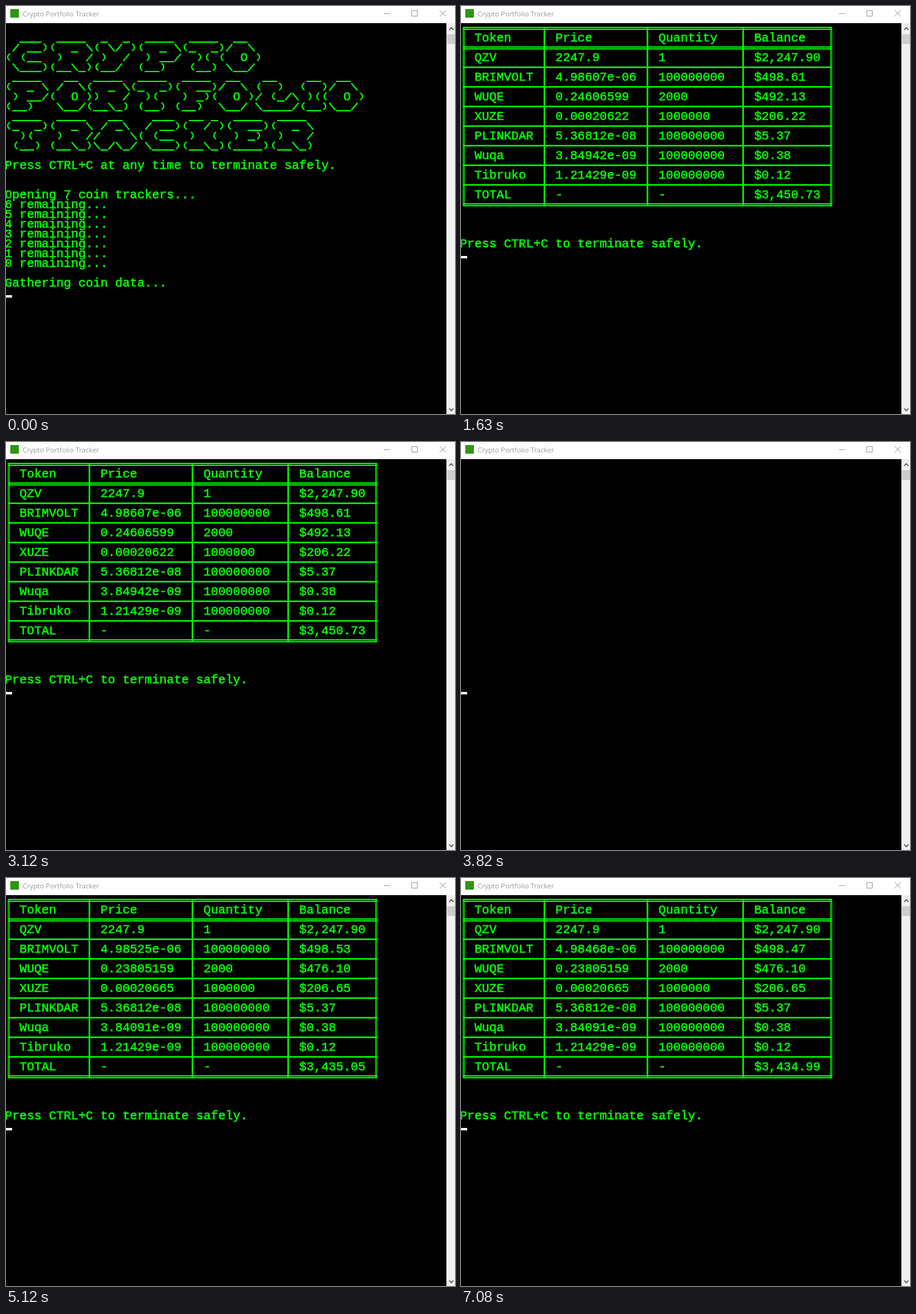
An HTML page with a canvas that plays this animation: 732 px wide and 666 px high, repeating every 7160 ms.

```html
<!DOCTYPE html>
<html lang="en">
<head>
<meta charset="utf-8">
<title>Crypto Portfolio Tracker</title>
<style>
  html, body { margin: 0; width: 100%; height: 100%; overflow: hidden; background: #000; }
  canvas { display: block; }
</style>
</head>
<body>
<canvas id="stage" width="732" height="666"></canvas>
<script>
const ctx = document.getElementById('stage').getContext('2d');
const LOOP = 7160;
const GREEN = '#0f0';
const CELL_W = 12, CELL_H = 16, LEFT = -2, TOP = 28;

const banner = String.raw`
  ___  ____  _  _  ____  ____  __
 / __)(  _ \( \/ )(  _ \(_  _)/  \
( (__  )   / )  /  ) __/  )( (  O )
 \___)(__\_)(__/  (__)   (__) \__/
 ____   __  ____  ____  ____  __   __    __  __
(  _ \ /  \(  _ \(_  _)(  __)/  \ (  )  (  )/  \
 ) __/(  O ))   /  )(   ) _)(  O )/ (_/\ )((  O )
(__)   \__/(__\_) (__) (__)  \__/ \____/(__)\__/
 ____  ____   __    ___  __ _  ____  ____
(_  _)(  _ \ / _\  / __)(  / )(  __)(  _ \
  )(   )   //    \( (__  )  (  ) _)  )   /
 (__) (__\_)\_/\_/ \___)(__\_)(____)(__\_)`.split('\n');

// Token, price, quantity, balance
const first = [
  ['Token', 'Price', 'Quantity', 'Balance'],
  ['QZV', '2247.9', '1', '$2,247.90'],
  ['BRIMVOLT', '4.98607e-06', '100000000', '$498.61'],
  ['WUQE', '0.24606599', '2000', '$492.13'],
  ['XUZE', '0.00020622', '1000000', '$206.22'],
  ['PLINKDAR', '5.36812e-08', '100000000', '$5.37'],
  ['Wuqa', '3.84942e-09', '100000000', '$0.38'],
  ['Tibruko', '1.21429e-09', '100000000', '$0.12'],
  ['TOTAL', '-', '-', '$3,450.73']
];

// Copy a table with new price and balance by row number
function update(rows, changes) {
  return rows.map((row, i) => {
    const [price, balance] = changes[i] || [row[1], row[3]];
    return [row[0], price, row[2], balance];
  });
}
const second = update(first, {
  2: ['4.98525e-06', '$498.53'],
  3: ['0.23805159', '$476.10'],
  4: ['0.00020665', '$206.65'],
  6: ['3.84091e-09', '$0.38'],
  8: ['-', '$3,435.05']
});
const third = update(second, {
  2: ['4.98468e-06', '$498.47'],
  8: ['-', '$3,434.99']
});

const scenes = [
  [0, splash],
  [1580, () => report(first)],
  [3820, () => cursor(23)],
  [3860, () => report(second)],
  [6050, () => report(third)]
];

function box(x, y, w, h, color) {
  ctx.fillStyle = color;
  ctx.fillRect(x, y, w, h);
}

function stroke(color, width, ...lines) {
  ctx.strokeStyle = color;
  ctx.lineWidth = width;
  ctx.beginPath();
  for (const line of lines) line.forEach(([x, y], i) => i ? ctx.lineTo(x, y) : ctx.moveTo(x, y));
  ctx.stroke();
}

function paren(x, y, side) {
  ctx.strokeStyle = GREEN;
  ctx.lineWidth = 2;
  ctx.beginPath();
  ctx.moveTo(x + 6 - 2.5 * side, y + 1.5);
  ctx.quadraticCurveTo(x + 6 + 5 * side, y + 7.5, x + 6 - 2.5 * side, y + 13.5);
  ctx.stroke();
}

const shapes = {
  '_': (x, y) => box(x, y + 14, CELL_W, 2, GREEN),
  '/': (x, y) => stroke(GREEN, 2, [[x + 1, y + 14], [x + 11, y + 2]]),
  '\\': (x, y) => stroke(GREEN, 2, [[x + 1, y + 2], [x + 11, y + 14]]),
  '(': (x, y) => paren(x, y, -1),
  ')': (x, y) => paren(x, y, 1)
};

function print(text, row, col = 0) {
  ctx.font = '20px "Liberation Mono", "DejaVu Sans Mono", monospace';
  ctx.textAlign = 'center';
  const y = TOP + row * CELL_H;
  [...text].forEach((ch, i) => {
    const x = LEFT + (col + i) * CELL_W;
    if (shapes[ch]) return shapes[ch](x, y);
    ctx.fillStyle = ctx.strokeStyle = GREEN;
    ctx.lineWidth = 0.6;
    ctx.fillText(ch, x + CELL_W / 2, y + 14);
    ctx.strokeText(ch, x + CELL_W / 2, y + 14);
  });
}

function cursor(row) {
  box(0, TOP + row * CELL_H + 12, 10, 4, '#fff');
}

function splash() {
  banner.forEach((line, row) => print(line, row));
  print('Press CTRL+C at any time to terminate safely.', 14);
  print('Opening 7 coin trackers...', 17);
  for (let n = 6; n >= 0; n--) print(n + ' remaining...', 24 - n);
  print('Gathering coin data...', 26);
  cursor(27);
}

function report(rows) {
  const cols = [2, 13, 27, 40];
  const across = (y, w) => stroke(GREEN, w, [[3, y], [605, y]]);
  const down = (x, w) => stroke(GREEN, w, [[x, 34], [x, 326]]);
  for (const y of [36, 68, 324]) {
    across(y - 1, 2);
    across(y + 2, 2);
  }
  for (let y = 100; y < 324; y += 32) across(y, 2.6);
  for (const x of [3.5, 5.5, 602.5, 604.5]) down(x, 1.3);
  for (const x of [136, 304, 460]) down(x, 2.6);
  rows.forEach((row, i) => row.forEach((text, c) => print(text, 1 + 2 * i, cols[c])));
  print('Press CTRL+C to terminate safely.', 22);
  cursor(23);
}

function frame() {
  box(0, 0, 732, 28, '#fff');
  box(7, 5, 14, 14, '#2f9614');
  ctx.font = '11.3px "Open Sans", "Noto Sans", sans-serif';
  ctx.textAlign = 'left';
  ctx.fillStyle = '#999';
  ctx.fillText('Crypto Portfolio Tracker', 27, 17);

  stroke('#999', 1, [[616, 12.5], [626, 12.5]], [[707, 7], [717, 17]], [[717, 7], [707, 17]]);
  ctx.strokeRect(661.5, 7.5, 9, 9);

  box(718, 28, 14, 638, '#f0f0f0');
  box(719, 46, 13, 16, '#cdcdcd');
  stroke('#505050', 1.6,
    [[722.5, 39], [726, 35.5], [729.5, 39]],
    [[722.5, 657], [726, 660.5], [729.5, 657]]);
}

function draw() {
  const t = performance.now() % LOOP;
  box(0, 0, 732, 666, '#000');
  scenes.findLast(([start]) => t >= start)[1]();
  frame();
  requestAnimationFrame(draw);
}
draw();
</script>
</body>
</html>
```
